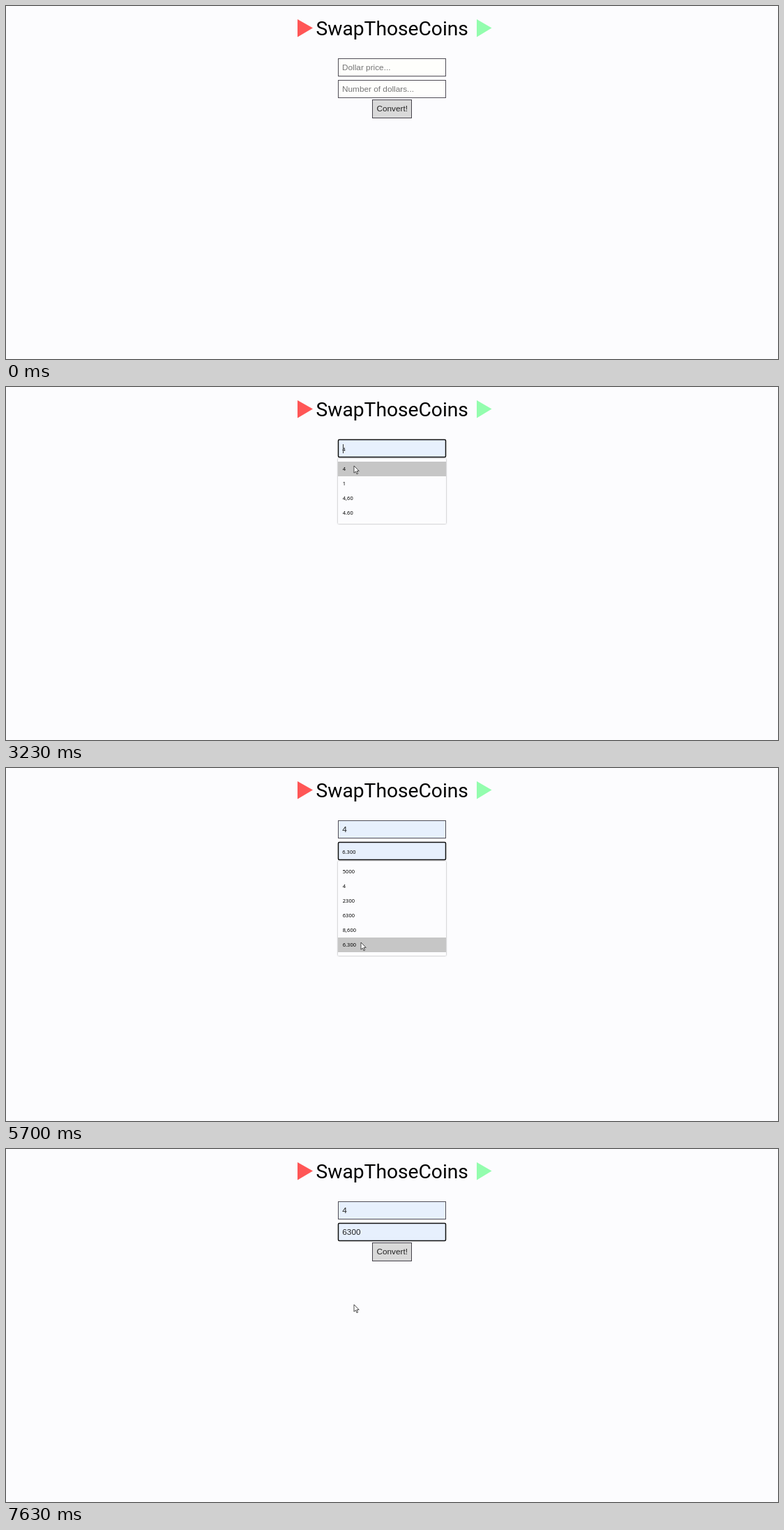
Write an HTML page that moves like this. It is 1107 by 506 pixels and loops after 8 s.

```html
<!DOCTYPE html>
<html lang="en">
<head>
<meta charset="utf-8">
<title>SwapThoseCoins</title>
<style>
  html, body { margin: 0; width: 100%; height: 100%; overflow: hidden; background: #fcfcfe; }
  svg { display: block; }
  .title { font: 28.2px Roboto, sans-serif; }
  .field { font: 11.8px "Liberation Sans", Arial, sans-serif; fill: #222; }
  .hint { fill: #757575; }
  .small { font: 7.5px "Noto Sans", "Open Sans", sans-serif; fill: #000; }
  .menu { fill: #fcfcfe; filter: drop-shadow(0 .7px .8px #0006); }
</style>
</head>
<body>
<svg width="1107" height="506" viewBox="0 0 1107 506">
  <path d="M418 19 440 31.5 418 44.5z" fill="#ff5656"/>
  <path d="M675 19 696.5 31.5 675 44.5z" fill="#93fdae"/>
  <text class="title" x="444.5" y="41.5">SwapThoseCoins</text>
  <rect x="525.5" y="134.5" width="56" height="26" fill="#d9d9d9" stroke="#45424b"/>
  <text class="field" x="531.4" y="151.3">Convert!</text>
  <g id="fields"></g>
  <g id="menus"></g>
  <g id="pointer">
    <path id="arrow" d="M0 0V10.2L2.4 8 4 11.8 5.6 11.1 4 7.4H7.2z" fill="#fff" stroke="#222" stroke-width=".8"/>
    <path id="beam" d="M-1.8-5H-.5L0-4.5.5-5H1.8M0-4.5V4.5M-1.8 5H-.5L0 4.5.5 5H1.8" fill="none" stroke="#222" stroke-width=".9"/>
  </g>
</svg>
<script>
const LOOP = 8000, STEP = 110, ROW = 21, LEFT = 476, WIDTH = 155;
const $ = id => document.getElementById(id);

// Times in ms: focus gained / lost, suggestion menu closed by a pick
const inputs = [
  { y: 75, hint: 'Dollar price...', items: ['4', '1', '4,60', '4.60'],
    focus: 2530, blur: 4400, pick: 3630, value: '4' },
  { y: 106, hint: 'Number of dollars...', items: ['5000', '4', '2300', '6300', '8,600', '6.300'],
    focus: 4400, blur: LOOP, pick: 7230, value: '6300' }
];

// Key points of the pointer's path
const path = [
  { t: 100, x: 338, y: 471 }, { t: 1130, x: 347, y: 390 }, { t: 1800, x: 565, y: 130 },
  { t: 2130, x: 504, y: 89 }, { t: 2530, x: 504, y: 89 }, { t: 3230, x: 499, y: 113 },
  { t: 3900, x: 499, y: 113 }, { t: 5030, x: 502, y: 127 }, { t: 5700, x: 509, y: 250 },
  { t: 6370, x: 512, y: 196 }, { t: 6800, x: 510, y: 209 }, { t: 7230, x: 510, y: 210 },
  { t: 7630, x: 499, y: 223 }
];

const rect = (x, y, w, h, attrs) => `<rect x="${x}" y="${y}" width="${w}" height="${h}" ${attrs}/>`;
const text = (x, y, kind, s) => `<text class="${kind}" x="${x}" y="${y}">${s}</text>`;
const mix = (a, b, p) => a + (b - a) * p;

// Eased between key points, moving in small jumps like a screen capture
function pointerAt(t) {
  const i = path.findLastIndex(k => k.t <= t);
  if (i < 0) return null;
  const a = path[i], b = path[i + 1] || a;
  const p = Math.floor((t - a.t) / STEP) * STEP / (b.t - a.t || 1);
  const ease = a === b ? 0 : p * p * (3 - 2 * p);
  return { x: mix(a.x, b.x, ease), y: mix(a.y, b.y, ease) };
}

const isOpen = (f, t) => t >= f.focus && t < f.pick;

function hoveredRow(f, t, pointer) {
  if (!pointer || !isOpen(f, t)) return -1;
  const row = Math.floor((pointer.y - f.y - 32) / ROW);
  return row < f.items.length ? row : -1;
}

function drawField(f, t, row) {
  const focused = t >= f.focus && t < f.blur;
  const picked = t >= f.pick;
  const fill = picked || row >= 0 ? '#e7f0fd' : '#fefefc';
  const line = focused ? 'rx="1.5" stroke="#101010" stroke-width="1.5"' : 'stroke="#504d56"';
  const label = picked ? text(482.3, f.y + 16.8, 'field', f.value)
    : row >= 0 ? text(482.3, f.y + 16.6, 'small', f.items[row])
    : text(482, f.y + 16.8, 'field hint', f.hint);
  const blinkOn = t % 1000 >= 100 && t % 1000 < 600;
  const caretX = picked ? 482.8 + f.value.length * 6.56 : 483;
  return rect(LEFT + .5, f.y + .5, WIDTH - 1, 25, `fill="${fill}" ${line}`) + label
    + (focused && blinkOn ? rect(caretX, f.y + 7, 1, 13, 'fill="#333"') : '');
}

function drawMenu(f, t, row) {
  if (!isOpen(f, t)) return '';
  const top = f.y + 32;
  return rect(LEFT, top - 4.5, WIDTH, f.items.length * ROW + 9.5, 'rx="1" class="menu"')
    + (row >= 0 ? rect(LEFT, top + row * ROW, WIDTH, ROW, 'fill="#c6c6c6"') : '')
    + f.items.map((s, i) => text(482.8, top + i * ROW + 13.2, 'small', s)).join('');
}

function drawPointer(t, pointer) {
  $('pointer').style.display = pointer ? '' : 'none';
  if (!pointer) return;
  const { x, y } = pointer;
  const overMenu = isOpen(inputs[0], t) && y > 101;
  const overField = !overMenu && x > LEFT && x < LEFT + WIDTH
    && inputs.some(f => y >= f.y && y < f.y + 26);
  $('pointer').setAttribute('transform', `translate(${x} ${y})`);
  $('arrow').style.display = overField ? 'none' : '';
  $('beam').style.display = overField ? '' : 'none';
}

function draw(t) {
  const pointer = pointerAt(t);
  const render = part => inputs.map(f => part(f, t, hoveredRow(f, t, pointer))).join('');
  $('fields').innerHTML = render(drawField);
  $('menus').innerHTML = render(drawMenu);
  drawPointer(t, pointer);
}

const begin = performance.now();
function tick() {
  draw((performance.now() - begin) % LOOP);
  requestAnimationFrame(tick);
}
tick();
</script>
</body>
</html>
```
